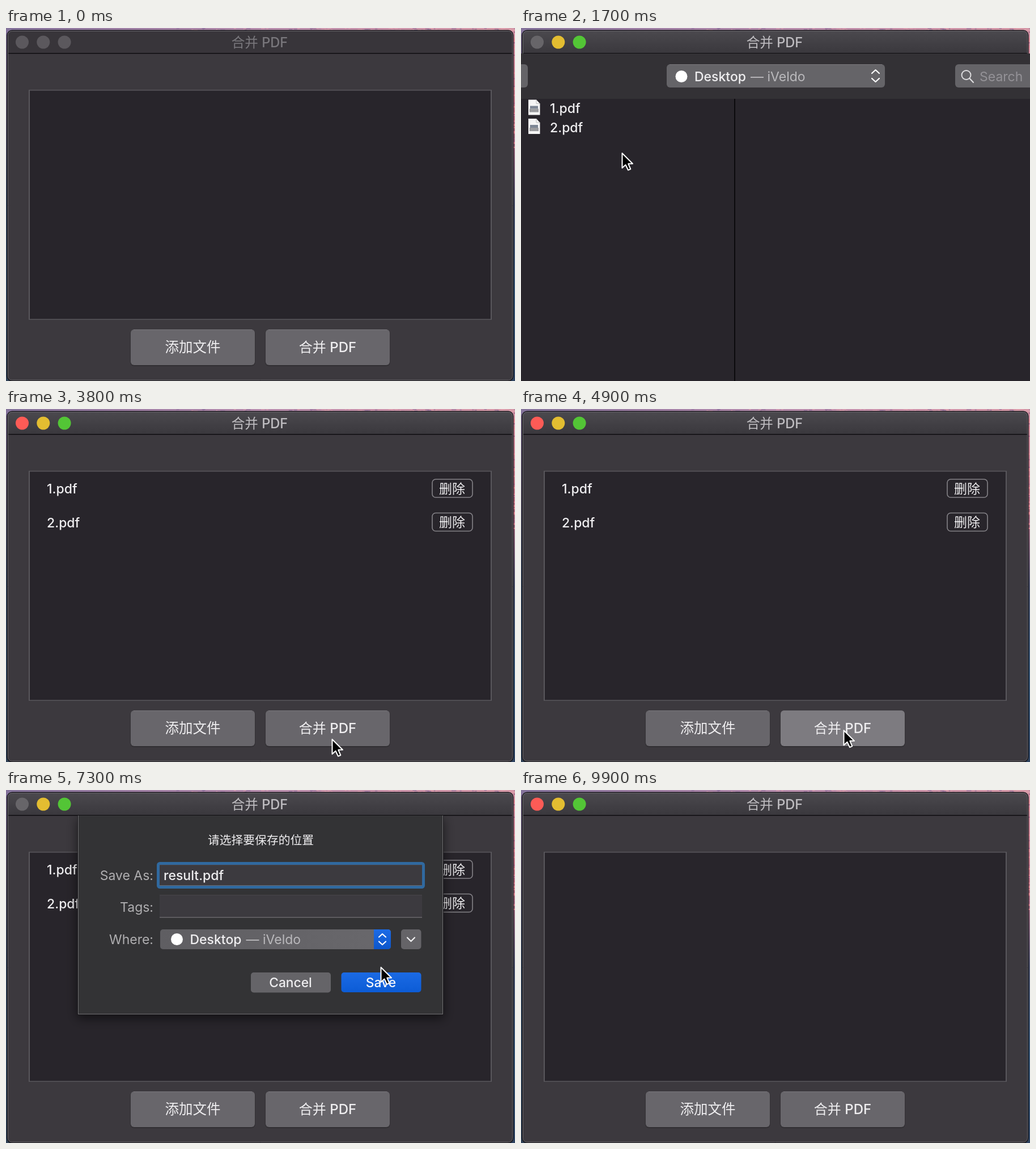
These frames come from a looping animation (898 by 623 pixels, 10000 ms). An HTML page with a canvas:

```html
<!DOCTYPE html>
<html lang="zh">
<head>
<meta charset="utf-8">
<title>合并 PDF</title>
<style>
  html, body { margin: 0; width: 100%; height: 100%; overflow: hidden; background: #28252b; }
  canvas { display: block; width: 898px; height: 623px; }
</style>
</head>
<body>
<canvas id="stage" width="898" height="623"></canvas>
<script>
const W = 898, H = 623, LOOP = 10000, STEP = 100;
const ctx = document.getElementById('stage').getContext('2d');
const FONT = 'Inter, "Noto Sans CJK SC", "Noto Sans CJK", sans-serif';
const LIST = '#28252b', PANE = '#3c393e', CONTROL = '#656468', BRIGHT = '#efeef0';

const clamp = v => Math.max(0, Math.min(1, v));
const ramp = (t, a, b) => clamp((t - a) / (b - a));
const ease = p => p * p * (3 - 2 * p);

function rect(x, y, w, h, fill) {
  ctx.fillStyle = fill;
  ctx.fillRect(x, y, w, h);
}

function round(x, y, w, h, r, fill, stroke, line = 1) {
  ctx.beginPath();
  ctx.roundRect(x, y, w, h, r);
  if (fill) { ctx.fillStyle = fill; ctx.fill(); }
  if (stroke) { ctx.strokeStyle = stroke; ctx.lineWidth = line; ctx.stroke(); }
}

function disc(x, y, r, fill) {
  ctx.beginPath();
  ctx.arc(x, y, r, 0, Math.PI * 2);
  ctx.fillStyle = fill;
  ctx.fill();
}

function polyline(points, color, width) {
  ctx.beginPath();
  points.forEach(([x, y]) => ctx.lineTo(x, y));
  ctx.strokeStyle = color;
  ctx.lineWidth = width;
  ctx.lineCap = ctx.lineJoin = 'round';
  ctx.stroke();
}

function text(str, x, y, { size = 23, color = BRIGHT, align = 'left', weight = 500 } = {}) {
  ctx.font = `${weight} ${size}px ${FONT}`;
  ctx.textAlign = align;
  ctx.fillStyle = color;
  ctx.fillText(str, x, y);
}

function gradient(x0, y0, x1, y1, ...colors) {
  const g = ctx.createLinearGradient(x0, y0, x1, y1);
  colors.forEach((c, i) => g.addColorStop(i / (colors.length - 1), c));
  return g;
}

function chevrons(x, y, dx, dy, gap, width = 2.2) {
  polyline([[x - dx, y - gap], [x, y - gap - dy], [x + dx, y - gap]], '#fff', width);
  polyline([[x - dx, y + gap], [x, y + gap + dy], [x + dx, y + gap]], '#fff', width);
}

// Wallpaper visible around the window edges
function drawWallpaper() {
  rect(0, 0, W, H, gradient(0, 0, 0, H, '#76678c', '#5b5369', '#34455e', '#344e6a', '#2f4056'));
  rect(W / 2, 0, W / 2, H, gradient(0, 0, 0, H, '#d193a4', '#b97484', '#4a5068', '#355270', '#2e4360'));
  rect(0, 0, W, 9, gradient(0, 0, W, 0, '#84739b', '#9f7fa4', '#b78eae', '#cb94ab', '#d79aa8'));
  let seed = 7;
  const rnd = () => (seed = seed * 16807 % 2147483647) / 2147483647;
  for (let i = 0; i < 90; i++) {
    rect(300 + rnd() * 598, rnd() * 4, 2 + rnd() * 7, 1, rnd() < .5 ? '#8a6e9a' : '#dfa2ae');
  }
  for (let i = 0; i < 40; i++) {
    rect(895, 6 + rnd() * 205, 3, 2, rnd() < .5 ? '#dc8b95' : '#a96f8d');
  }
}

function drawWindow(active, modal) {
  round(2.5, 4.5, 892, 618, 8, PANE, '#17161a', 2);
  ctx.save();
  ctx.beginPath();
  ctx.roundRect(3, 5, 891, 617, 7);
  ctx.clip();
  rect(3, 5, 891, 39, active ? gradient(0, 5, 0, 44, '#4b494e', '#3a383d') : '#38353a');
  rect(3, 44, 891, 1.5, '#0e0d10');
  ctx.restore();
  round(3.5, 5.5, 890, 616, 7, null, '#69676c');

  const grey = active ? '#676569' : '#5b585d';
  const lights = active ? [modal ? grey : '#fd5b56', '#e3bd31', '#53c536'] : [grey, grey, grey];
  lights.forEach((c, i) => disc(28.5 + i * 37.3, 25, 11.5, c));
  text('合并 PDF', 447.5, 34, { size: 23.6, color: active ? '#bfbdc1' : '#79777c', align: 'center' });
}

function drawButton(label, x, size, pressed) {
  ctx.save();
  ctx.shadowColor = 'rgba(0,0,0,.4)';
  ctx.shadowBlur = 2;
  ctx.shadowOffsetY = 1;
  round(x, 532, 219, 63, 6, pressed ? '#7d7b80' : '#68666b');
  ctx.restore();
  rect(x + 5, 532, 209, 1, '#7b797e');
  text(label, x + 109.5, 572, { size, align: 'center' });
}

function drawMain(filled, addDown, mergeDown) {
  rect(40, 109, 817, 406, '#59575c');
  rect(42, 110.5, 813, 403, LIST);
  if (filled) {
    ['1.pdf', '2.pdf'].forEach((name, i) => {
      const y = i * 59.5;
      text(name, 72, 149 + y);
      round(752, 124 + y, 71, 32, 6, null, '#858388', 1.6);
      text('删除', 787, 148.5 + y, { align: 'center' });
    });
  }
  drawButton('添加文件', 220, 24.5, addDown);
  drawButton('合并 PDF', 458, 24, mergeDown);
}

function drawLocation(x, y) {
  disc(x, y - 8.5, 10.5, '#fff');
  text('Desktop', x + 23, y);
  text('— iVeldo', x + 122, y, { color: '#bab9bc', weight: 400 });
}

function drawFileIcon(y) {
  ctx.beginPath();
  [[13, 0], [27, 0], [33.5, 7], [33.5, 27], [13, 27]].forEach(([px, py]) => ctx.lineTo(px, y + py));
  ctx.fillStyle = '#f5f5f5';
  ctx.fill();
  polyline([[27, y + .5], [27, y + 7], [33, y + 7]], '#bcbcbc', 1);
  rect(16, y + 11, 14, 5, '#7d8694');
  rect(15, y + 16, 16, 6, '#9a9b9e');
}

// Draws a sheet sliding out from under the title bar
function slide(p, height, draw) {
  if (p <= 0) return;
  ctx.save();
  ctx.beginPath();
  ctx.rect(0, 45, W, H - 45);
  ctx.clip();
  ctx.translate(0, (p - 1) * height);
  draw();
  ctx.restore();
}

function drawOpenSheet(selected) {
  rect(0, 45, W, H, LIST);
  rect(0, 45, W, 80, '#333135');
  round(-12, 64, 24, 41, 6, CONTROL);
  round(257, 64, 385, 41, 6, CONTROL);
  rect(262, 64, 375, 1, '#7b797e');
  drawLocation(283, 94);
  chevrons(625.5, 84.5, 6.5, 6, 4.5);
  round(766, 64, 150, 41, 6, CONTROL);
  ctx.beginPath();
  ctx.arc(785.5, 83, 8, 0, Math.PI * 2);
  ctx.strokeStyle = '#dddcde';
  ctx.lineWidth = 2;
  ctx.stroke();
  polyline([[791.5, 89], [798, 96]], '#dddcde', 2.2);
  text('Search', 809, 94, { color: '#949297', weight: 400 });

  ['1.pdf', '2.pdf'].forEach((name, i) => {
    const y = i * 33.5;
    if (i < selected) rect(0, 125 + y, 376, 32, '#0058d0');
    drawFileIcon(126.5 + y);
    text(name, 51, 150 + y);
  });
  rect(376, 125, 2, H, '#0b0a0d');
}

function drawField(y, h) {
  rect(271, y, 463, h, '#3c3a3f');
  rect(271, y, 463, 1, '#474549');
  rect(271, y + h - 1, 463, 1.5, '#6a686c');
}

function drawSaveSheet(s) {
  ctx.save();
  ctx.shadowColor = 'rgba(0,0,0,.55)';
  ctx.shadowBlur = 18;
  ctx.shadowOffsetY = 6;
  rect(126, 45, 646, 352, '#1b1a1d');
  ctx.restore();
  rect(127, 45, 644, 351, '#706f72');
  rect(128, 45, 642, 350, '#333335');

  text('请选择要保存的位置', 449.5, 96, { size: 20.8, align: 'center' });
  const label = { color: '#b0afb1', align: 'right', weight: 400 };
  text('Save As:', 260, 159, label);
  text('Tags:', 260, 215, label);
  text('Where:', 260, 272, label);

  drawField(132, 37);
  drawField(185, 40);
  if (s.focus > 0) {
    ctx.globalAlpha = s.focus;
    round(268.5, 129.5, 468, 42, 3, null, '#30699f', 5);
    ctx.globalAlpha = 1;
  }
  if (s.typed === 0) rect(277, 135, 90, 29, '#3f648c');
  const name = s.typed ? 'result'.slice(0, s.typed) : 'Untitled';
  text(name + '.pdf', 278, 159);
  if (s.caret) rect(278 + ctx.measureText(name).width, 136, 1.6, 28, '#eee');

  round(272, 246, 407, 35, 5, gradient(272, 0, 679, 0, '#5f5e62', '#69686c'));
  round(649, 246, 30, 35, [0, 5, 5, 0], gradient(0, 246, 0, 281, '#1c6be6', '#0c56cb'));
  drawLocation(301.5, 272);
  chevrons(664, 263.5, 6, 5.5, 4);
  round(697, 246, 35.5, 35, 5, CONTROL);
  polyline([[708, 260.5], [714.5, 267], [721, 260.5]], '#f2f2f3', 2.2);

  round(432, 322, 141, 35.5, 5, CONTROL);
  text('Cancel', 502, 348, { size: 22.8, align: 'center' });
  round(591.5, 322, 141, 35, 5,
    s.saveDown ? '#0a4db5' : gradient(0, 322, 0, 357, '#1b6ae4', '#0c5cd6'));
  text('Save', 661.5, 348, { size: 22.8, align: 'center', color: '#f4f6fb' });
}

// Pointer stops: [ms, x, y]
const PATH = [
  [0, 480, 660], [300, 420, 610], [700, 335, 567], [1300, 335, 567], [1700, 178, 220],
  [2000, 122, 140], [2300, 122, 140], [2500, 120, 172], [2700, 122, 174], [3000, 640, 670],
  [3400, 640, 670], [3800, 575, 582], [4200, 569, 570], [5000, 569, 566], [5400, 508, 422],
  [6800, 508, 422], [7300, 661, 312], [7500, 664, 328], [8000, 664, 328],
  [9000, 700, 352], [9300, 910, 420], [LOOP, 910, 420]
];

function pointerAt(t) {
  const i = Math.max(1, PATH.findIndex(k => k[0] > t));
  const [t0, x0, y0] = PATH[i - 1], [t1, x1, y1] = PATH[i];
  const p = ease(ramp(t, t0, t1));
  return [x0 + (x1 - x0) * p, y0 + (y1 - y0) * p];
}

function drawPointer(x, y) {
  ctx.save();
  ctx.translate(x + .5, y + 1);
  ctx.beginPath();
  [[0, 0], [0, 26], [6, 20.5], [10.5, 29.8], [14.8, 28], [10.8, 18.6], [18.5, 18.5]]
    .forEach(([px, py]) => ctx.lineTo(px, py));
  ctx.closePath();
  ctx.lineJoin = 'round';
  ctx.strokeStyle = '#fff';
  ctx.lineWidth = 2;
  ctx.fillStyle = '#000';
  ctx.fill();
  ctx.stroke();
  ctx.restore();
}

function render(t) {
  const within = (a, b) => t >= a && t < b;
  const openP = ease(ramp(t, 1000, 1200)) * (1 - ease(ramp(t, 3200, 3500)));
  const saveP = ease(ramp(t, 5000, 5300)) * (1 - ease(ramp(t, 7600, 7900)));

  drawWallpaper();
  drawWindow(t >= 600, openP > 0 || saveP > 0);
  drawMain(within(3500, 8100), within(800, 1100), within(4800, 5000));
  slide(openP, 600, () => drawOpenSheet(t >= 2600 ? 2 : t >= 2100 ? 1 : 0));
  slide(saveP, 370, () => drawSaveSheet({
    focus: ramp(t, 5400, 5700),
    typed: Math.max(0, Math.min(6, Math.floor((t - 5900) / 130))),
    caret: within(6030, 6900),
    saveDown: within(7500, 7700)
  }));
  if (!within(6000, 6800)) drawPointer(...pointerAt(t));
}

function tick() {
  const t = performance.now() % LOOP;
  render(Math.floor(t / STEP) * STEP);
  requestAnimationFrame(tick);
}
tick();
</script>
</body>
</html>
```
